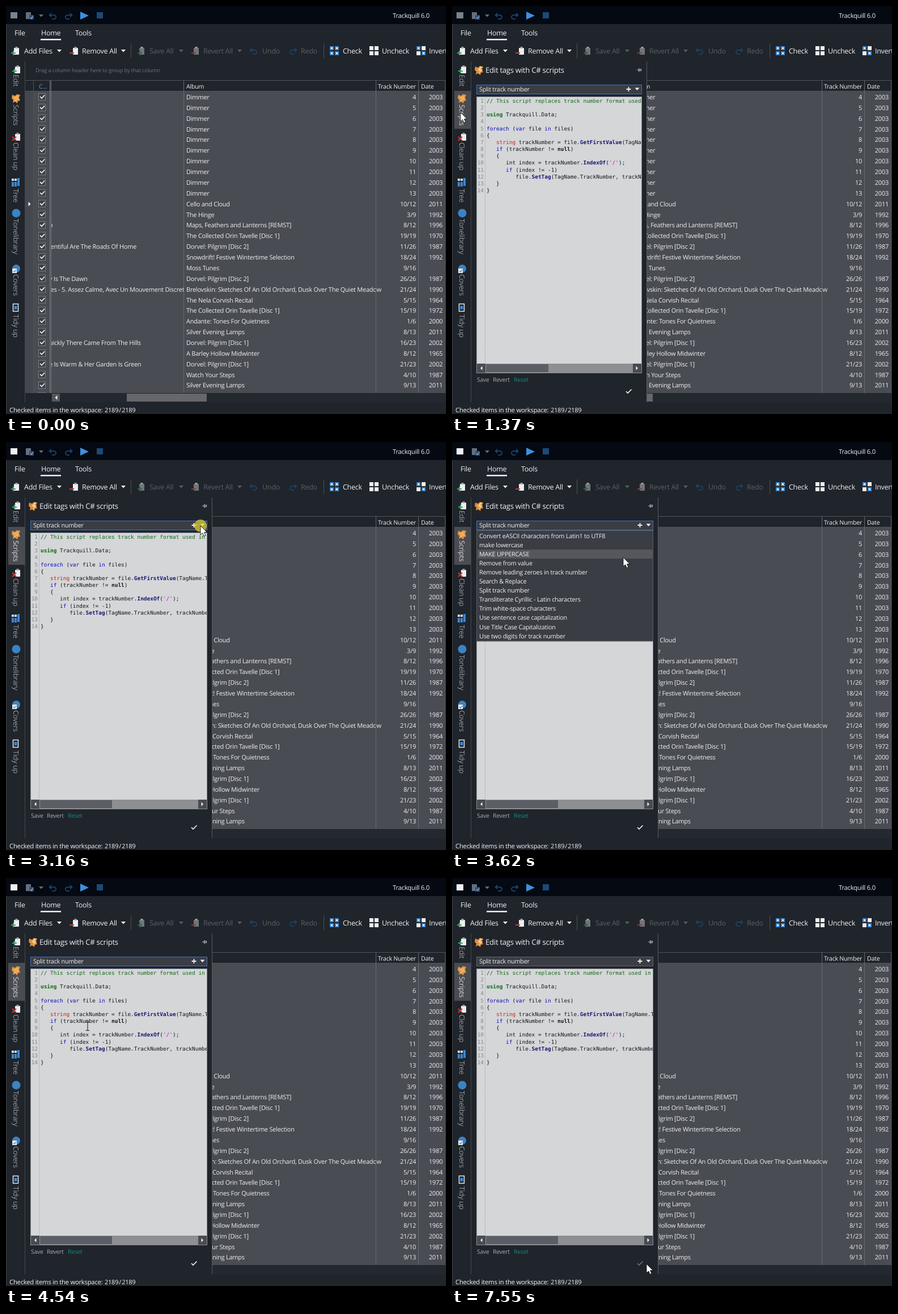
Recreate the animation shown at these times as an HTML page. Size 776x721 px, loop 8000 ms.

```html
<!DOCTYPE html>
<html lang="en">
<head>
<meta charset="utf-8">
<title>Tag editor</title>
<style>
  html, body { margin: 0; width: 100%; height: 100%; overflow: hidden; background: #20242b; }
  svg { display: block; width: 776px; height: 721px; }
  text { font-family: "Open Sans", "Noto Sans", sans-serif; letter-spacing: -.022em; text-rendering: geometricPrecision; white-space: pre; }
  .code { font: 9.45px "DejaVu Sans Mono", "Noto Sans Mono", monospace; letter-spacing: 0; }
  .note { fill: #17691b; }
  .char { fill: #d010c8; }
  .using { fill: #0a6a12; font-weight: bold; }
  .word { fill: #1010b8; }
  .ref { fill: #d81a1a; }
  .nil { font-weight: bold; }
  .call { fill: #191970; font-weight: bold; }
</style>
</head>
<body>
<svg id="stage" viewBox="0 0 776 721"></svg>
<script>
const LOOP = 8000;
const stage = document.getElementById('stage');

function el(tag, attrs, parent = stage) {
  const node = document.createElementNS('http://www.w3.org/2000/svg', tag);
  set(node, attrs);
  return parent.appendChild(node);
}
function set(node, attrs) {
  for (const key in attrs) node.setAttribute(key, attrs[key]);
}
const group = (parent, attrs = {}) => el('g', attrs, parent);
const rect = (x, y, width, height, fill, parent, more = {}) =>
  el('rect', { x, y, width, height, fill, ...more }, parent);
const fillPath = (d, fill, parent) => el('path', { d, fill }, parent);
const linePath = (d, stroke, width = 1, parent) =>
  el('path', { d, stroke, 'stroke-width': width, fill: 'none' }, parent);
function label(x, y, string, size, fill, parent, more = {}) {
  const node = el('text', { x, y, 'font-size': size, fill, ...more }, parent);
  node.textContent = string;
  return node;
}
function clip(id, x, y, width, height) {
  return rect(x, y, width, height, '#000', el('clipPath', { id }));
}
const show = (node, on) => node.setAttribute('visibility', on ? 'visible' : 'hidden');
const chevron = (x, y, fill, parent) => fillPath(`M${x - 4} ${y - 2}h8l-4 4.5z`, fill, parent);

const WHITE = '#f0f1f3', DIM = '#5a5e66', BG = '#20242b', EDGE = '#50545b';

// Title bar
rect(0, 0, 776, 721, BG);
rect(0, 0, 776, 32, '#040912');
const appMark = rect(8, 11, 12, 11, '#7d8188');
rect(35, 11, 9, 12, '#66707c');
fillPath('M41 16h8v8h-8z', '#2b5077');
linePath('M43 20l2 2 3-4', '#9db4cc', 1.2);
chevron(62, 17, '#6b6f76');

function undoArrow(x, y, flip, stroke) {
  const g = group(stage, { transform: `translate(${x} ${y}) scale(${flip} 1)` });
  linePath('M-6-1H1a4 3.4 0 0 1 0 7H-2', stroke, 2, g);
  fillPath('M-8-1l5-4.5v9z', stroke, g);
}
undoArrow(83, 17, 1, '#1c3f63');
undoArrow(110, 17, -1, '#1c3f63');
fillPath('M131 10l15 7-15 7z', '#3f8fe0');
rect(160, 11, 11, 11, '#1b4a78');
label(747, 20.5, 'Trackquill 6.0', 11.25, WHITE, stage, { 'text-anchor': 'end' });

// Ribbon
for (const [x, name] of [[15, 'File'], [62, 'Home'], [122, 'Tools']])
  label(x, 52, name, 12.5, WHITE);
rect(61, 58, 36, 2.5, WHITE);

function clipboard(x, y, badge, sign, paper = '#eceef0') {
  rect(x, y, 9, 12, paper, stage, { rx: 1 });
  rect(x + 2.5, y - 2, 4, 3, '#9da1a7');
  linePath(sign, badge, 2.2);
}
clipboard(14, 74, '#3fa66a', 'M9 83h8M13 79v8');
clipboard(118, 74, '#c23a2c', 'M112 83h8');
clipboard(235, 74, '#32664a', 'M232 83h8M236 79v8', '#70747b');
clipboard(331, 74, '#8a3b32', 'M327 83h8', '#70747b');
undoArrow(437, 79, 1, '#1d3f63');
undoArrow(506, 79, -1, '#1d3f63');
for (const [x, name, fill] of [
  [32, 'Add Files', WHITE], [134, 'Remove All', WHITE], [253, 'Save All', DIM],
  [348, 'Revert All', DIM], [452, 'Undo', DIM], [520, 'Redo', DIM],
  [594, 'Check', WHITE], [663, 'Uncheck', WHITE], [746, 'Invert', WHITE]
]) label(x, 84, name, 12.5, fill);
for (const x of [94, 207]) chevron(x, 79, WHITE);
for (const x of [309, 412]) chevron(x, 79, DIM);
for (const x of [220.5, 560.5]) linePath(`M${x} 66V92`, '#4b4f56');

function tiles(x, fills) {
  fills.forEach((fill, i) => {
    const left = x + i % 2 * 9, top = 71 + (i >> 1) * 9;
    rect(left, top, 7, 7, fill);
    if (fill !== WHITE) rect(left + 2, top + 2, 3, 3, WHITE);
  });
}
const BLUE = '#3b86cf';
tiles(571, [BLUE, BLUE, BLUE, BLUE]);
tiles(641, [WHITE, WHITE, WHITE, WHITE]);
tiles(724, [BLUE, WHITE, WHITE, BLUE]);

// Grid
label(52, 117, 'Drag a column header here to group by that column', 9.5, '#6d7178');
rect(34, 151, 740, 533, '#4a4c53');
rect(34, 151, 14, 533, '#45474e');
clip('rows', 80, 151, 694, 533);
clip('checks', 34, 151, 46, 533);
const rows = group(stage, { 'clip-path': 'url(#rows)' });
const checks = group(stage, { 'clip-path': 'url(#checks)' });
const firstDisc = [4, 5, 6, 7, 8, 9, 10, 11, 12, 13].map(n => ['Dimmer', n, 2003]);
const collected = 'The Collected Orin Tavelle [Disc 1]';
const table = [
  ...firstDisc,
  ['Cello and Cloud', '10/12', 2011],
  ['The Hinge', '3/9', 1992],
  ['Maps, Feathers and Lanterns [REMST]', '8/12', 1996, 'o'],
  [collected, '19/19', 1970],
  ['Dorvel: Pilgrim [Disc 2]', '11/26', 1987, 'lentiful Are The Roads Of Home'],
  ['Snowdrift! Festive Wintertime Selection', '18/24', 1992],
  ['Moss Tunes', '9/16', ''],
  ['Dorvel: Pilgrim [Disc 2]', '26/26', 1987, 'y Is The Dawn'],
  ['Brelovskin: Sketches Of An Old Orchard, Dusk Over The Quiet Meadow', '21/24', 1990,
    'les - 5. Assez Calme, Avec Un Mouvement Discret'],
  ['The Nela Corvish Recital', '5/15', 1964],
  [collected, '15/19', 1972],
  ['Andante: Tones For Quietness', '1/6', 2000],
  ['Silver Evening Lamps', '8/13', 2011],
  ['Dorvel: Pilgrim [Disc 1]', '16/23', 2002, 'uickly There Came From The Hills'],
  ['A Barley Hollow Midwinter', '8/12', 1965],
  ['Dorvel: Pilgrim [Disc 1]', '21/23', 2002, 'e Is Warm & Her Garden Is Green'],
  ['Watch Your Steps', '4/10', 1987],
  ['Silver Evening Lamps', '9/13', 2011],
  ['', '', '']
];
const CELL = '#eeeff1';
table.forEach(([album, track, year, song = ''], i) => {
  const y = 161 + i * 18.87, end = { 'text-anchor': 'end' };
  label(76, y + 4, song, 11, CELL, rows);
  label(318, y + 4, album, 11, CELL, rows);
  label(723, y + 4, track, 11, CELL, rows, end);
  label(770, y + 4, year, 11, CELL, rows, end);
  rect(57.5, y - 6.5, 12, 12, '#3c3e45', checks, { stroke: '#7c7f85' });
  linePath(`M60 ${y - 1}l3 3 5-5.5`, WHITE, 1.7, checks);
});
fillPath('M39.500 346v8l4-4z', WHITE);
linePath('M34 131.500H775M34 150.500H775M48.500 132V684M774.500 132V684', EDGE);
linePath('M313.500 132V684M652.500 132V684M727.500 132V684', '#666970');
linePath('M77.500 132V684M79.500 132V684', '#777a80');
label(58, 145.5, 'C...', 10.6, '#6496d6');
label(318, 145.5, 'Album', 10.6, WHITE);
label(656, 145.5, 'Track Number', 10.6, WHITE);
label(732, 145.5, 'Date', 10.6, WHITE);
rect(80, 685, 696, 15, '#24282f');
rect(81, 685, 14, 14, '#53565d');
fillPath('M90.500 688v8l-4-4z', WHITE);
rect(213, 685, 141, 14, '#65676c');
label(6, 717.5, 'Checked items in the workspace:', 11.3, WHITE);
label(174, 717.5, '2189 / 2189', 11, WHITE, stage, { 'word-spacing': -1.5 });

// Side tabs
linePath('M.500 32V721', '#3d4148');
linePath('M33.500 98V700', '#43474e');
const tabGlow = rect(4, 150, 29, 67, '#4a4c52');
clipboard(16, 107, '#3fa66a', 'M11 115h8M15 111v8');
clipboard(16, 226, '#cf3226', 'M11 231l7 7M18 231l-7 7');
const scroll = 'l5 2 3-3 6 1-2 5 2 5-4 1-1 4-4-3-4 2 1-5-3-3z';
fillPath('M11 157' + scroll, '#e39a45');
linePath('M14 163l7-3M15 167l7-4', '#fbd7a5', 1.2);
for (const [x, y, h] of [[10, 305, 4], [15, 305, 4], [20, 304, 14], [10, 311, 8], [15, 311, 8]])
  rect(x, y, 4, h, h > 4 ? BLUE : '#cfe0f2');
el('circle', { cx: 18, cy: 366, r: 7.5, fill: '#3b83c4' });
el('circle', { cx: 18, cy: 464, r: 7, fill: '#3b83c4' });
rect(11, 464, 8, 8, '#e6e9ec');
linePath('M13 468l2 2 3-4', BLUE, 1.2);
rect(12.5, 526.5, 9, 13, BG, stage, { stroke: '#e6e9ec', 'stroke-width': 1.5 });
rect(14.5, 530, 5, 6, BLUE);
const tabs = [[121, 'Edit'], [174, 'Scripts'], [241, 'Clean up'], [323, 'Tree'],
  [376, 'Tonelibrary'], [474, 'Covers'], [545, 'Tidy up']].map(([y, name]) =>
  label(0, 0, name, 12.5, '#999ca2', stage, { transform: `translate(13 ${y}) rotate(90)` }));

// Script panel, laid out for a right edge at OPEN
const OPEN = 364;
const panelClip = clip('panel', 34, 98, 331, 602);
const codeClip = clip('code', 44, 161, 310, 471);
const panel = group(stage, { 'clip-path': 'url(#panel)' });
const panelBack = rect(34, 98, 330, 602, BG, panel);
fillPath('M41 107' + scroll, '#dd8f3a', panel);
fillPath('M50 107l-5 7h4l-2 6 7-8h-4l3-5z', '#f7cf8f', panel);
label(59, 118, 'Edit tags with C# scripts', 13.2, WHITE, panel);
const combo = rect(43.5, 139.5, 311, 16, '#3a3d44', panel);
label(48, 151, 'Split track number', 10.85, WHITE, panel);
const codeBox = rect(43.5, 160.5, 311, 488, '#d4d6d8', panel, { stroke: '#8b8d91' });
linePath('M58.500 162V632', '#9fa8a0', 1, panel).setAttribute('stroke-dasharray', '1 1');

const code = group(panel, { 'clip-path': 'url(#code)' });
const syntax = /(?<note>\/\/.*)|(?<char>'.')|\b(?<using>using)\b|\b(?<word>foreach|var|in|if)\b|\b(?<ref>string)\b|\b(?<nil>null)\b|(?<call>\w+(?=\())/g;
`// This script replaces track number format used in some files

using Trackquill.Data;

foreach (var file in files)
{
   string trackNumber = file.GetFirstValue(TagName.TrackNumber);
   if (trackNumber != null)
   {
      int index = trackNumber.IndexOf('/');
      if (index != -1)
         file.SetTag(TagName.TrackNumber, trackNumber.Substring(0, index));
   }
}`.split('\n').forEach((source, i) => {
  const y = 171 + i * 12.15;
  label(56, y, i + 1, 9.45, '#85888c', code, { class: 'code', 'text-anchor': 'end' });
  const line = label(61, y, '', 9.45, '#14161a', code, { class: 'code' });
  let from = 0;
  for (const match of source.matchAll(syntax)) {
    line.append(source.slice(from, match.index));
    const kind = Object.keys(match.groups).find(key => match.groups[key]);
    el('tspan', { class: kind }, line).textContent = match[0];
    from = match.index + match[0].length;
  }
  line.append(source.slice(from));
});

const track = rect(44, 632, 310, 16, '#8d8f93', panel);
rect(44, 632, 15, 16, '#484b52', panel);
fillPath('M53.500 636.500v7l-3.500-3.500z', WHITE, panel);
const thumb = rect(60, 633, 127, 14, '#5b5e64', panel);
for (const [x, name, fill] of [[44, 'Save', '#a9acb1'], [72, 'Revert', '#a9acb1'], [109, 'Reset', '#128a80']])
  label(x, 664, name, 10.4, fill, panel);

const right = group(panel);
linePath('M346 113h3M349.500 110v6M349.500 111.500h4v2.500h-4M349.500 114.500h4', '#b5b8bd', 1.1, right);
linePath('M327.500 147h8M331.500 143v8', WHITE, 1.8, right);
chevron(346.5, 146.5, WHITE, right);
rect(339, 632, 15, 16, '#484b52', right);
fillPath('M344.500 636.500v7l3.500-3.500z', WHITE, right);
const runMark = linePath('M327 681l3 3 6.500-6.500', WHITE, 1.7, right);
linePath('M363.500 98V700', '#565a61', 1, right);

function layPanel(edge) {
  const shift = edge - OPEN;
  set(right, { transform: `translate(${shift})` });
  set(panelClip, { width: 331 + shift });
  set(codeClip, { width: 310 + shift });
  set(panelBack, { width: 330 + shift });
  for (const box of [combo, codeBox]) set(box, { width: 311 + shift });
  set(track, { width: 310 + shift });
  set(thumb, { width: 127 + shift * .85 });
}

// Script list
const ROW = 16.05, LIST_TOP = 158;
const list = group(stage);
rect(43.5, 156.5, 311, 195.5, '#3b3d44', list, { stroke: '#5b5e64' });
const hover = rect(45, LIST_TOP, 308.5, 16, '#55575d', list);
const scripts = ['Convert eASCII characters from Latin1 to UTF8', 'make lowercase', 'MAKE UPPERCASE',
  'Remove from value', 'Remove leading zeroes in track number', 'Search & Replace', 'Split track number',
  'Transliterate Cyrillic - Latin characters', 'Trim white-space characters',
  'Use sentence case capitalization', 'Use Title Case Capitalization', 'Use two digits for track number'];
scripts.forEach((name, i) => label(48, 170 + i * ROW, name, 10.85, WHITE, list));

const tip = group(stage);
rect(343.5, 701.5, 105, 19, '#3b3d44', tip, { stroke: '#6a6d73' });
label(350, 715, 'Execute this script', 10.85, WHITE, tip);

// Pointer
const click = el('circle', { r: 11, fill: '#e6d52f', opacity: .7 });
const pointer = group(stage);
const arrow = el('path', { d: 'M0 0V16L3.700 12.700 6.300 18.300 9 17.200 6.600 11.600H11.500Z',
  fill: '#fff', stroke: '#000', 'stroke-width': .8 }, pointer);
const beam = linePath('M-3.500-7.500H-.700L0-6.800.700-7.500H3.500M0-7V7M-3.500 7.500H-.700L0 6.800.700 7.500H3.500', '#22252a', 1.1, pointer);

const STEPS = 11;
const moves = [
  [500, 1280, [[820, 790], [600, 600], [400, 440], [210, 300], [70, 212], [15, 188]]],
  [2220, 3000, [[15, 188], [75, 184], [165, 172], [255, 158], [320, 150], [343, 148]]],
  [3540, 4310, [[343, 148], [297, 209], [235, 250], [188, 270], [158, 268], [144, 262]]],
  [4710, 5460, [[145, 263], [95, 205], [64, 165], [88, 160], [145, 205], [181, 263]]],
  [5770, 6540, [[181, 263], [239, 440], [315, 634], [361, 692], [352, 687], [343, 682]]]
];

function spline(points, u) {
  const last = points.length - 1;
  const i = Math.min(last - 1, Math.floor(u * last)), s = u * last - i;
  const at = n => points[Math.max(0, Math.min(last, n))];
  return [0, 1].map(axis => {
    const [a, b, c, d] = [-1, 0, 1, 2].map(n => at(i + n)[axis]);
    return b + s / 2 * (c - a + s * (2 * a - 5 * b + 4 * c - d + s * (3 * (b - c) + d - a)));
  });
}
function pointerAt(t) {
  const move = moves.filter(([start]) => t >= start).pop();
  if (!move) return [820, 790];
  const [start, end, points] = move;
  const step = Math.min(STEPS, 1 + Math.floor((t - start) / (end - start) * (STEPS - 1) + .15));
  return spline(points, step / STEPS);
}

const within = (t, ...spans) => spans.some(([from, to]) => t >= from && t < to);

function draw(t) {
  const [x, y] = pointerAt(t);
  const listOpen = within(t, [3230, 4540]);

  show(tabGlow, t >= 1200);
  set(tabs[1], { fill: t >= 1200 ? '#d8dadd' : '#999ca2' });
  set(appMark, { fill: t >= 1830 ? WHITE : '#7d8188' });
  show(panel, t >= 1280);
  layPanel(t < 1370 ? 264 : t < 1450 ? 344 : OPEN);
  set(combo, { stroke: t < 7550 ? '#4574b8' : '#62656b' });
  set(runMark, { stroke: t < 7550 ? WHITE : '#6b6e73' });

  show(list, listOpen);
  const row = y < LIST_TOP ? 6 : Math.floor((y - LIST_TOP) / ROW);
  set(hover, { y: LIST_TOP + row * ROW });

  show(tip, within(t, [6850, 7460]));
  set(tip, { opacity: t < 6930 ? .5 : 1 });

  show(click, within(t, [1750, 1920], [3070, 3230], [4390, 4540], [7460, 7550]));
  set(click, { cx: x, cy: y });
  set(pointer, { transform: `translate(${x.toFixed(1)} ${y.toFixed(1)})` });
  const overCode = t >= 1450 && !listOpen && x > 58 && x < 354 && y > 160 && y < 632;
  show(beam, overCode);
  show(arrow, !overCode);
}

const began = performance.now();
function tick() {
  draw((performance.now() - began) % LOOP);
  requestAnimationFrame(tick);
}
tick();
</script>
</body>
</html>
```
